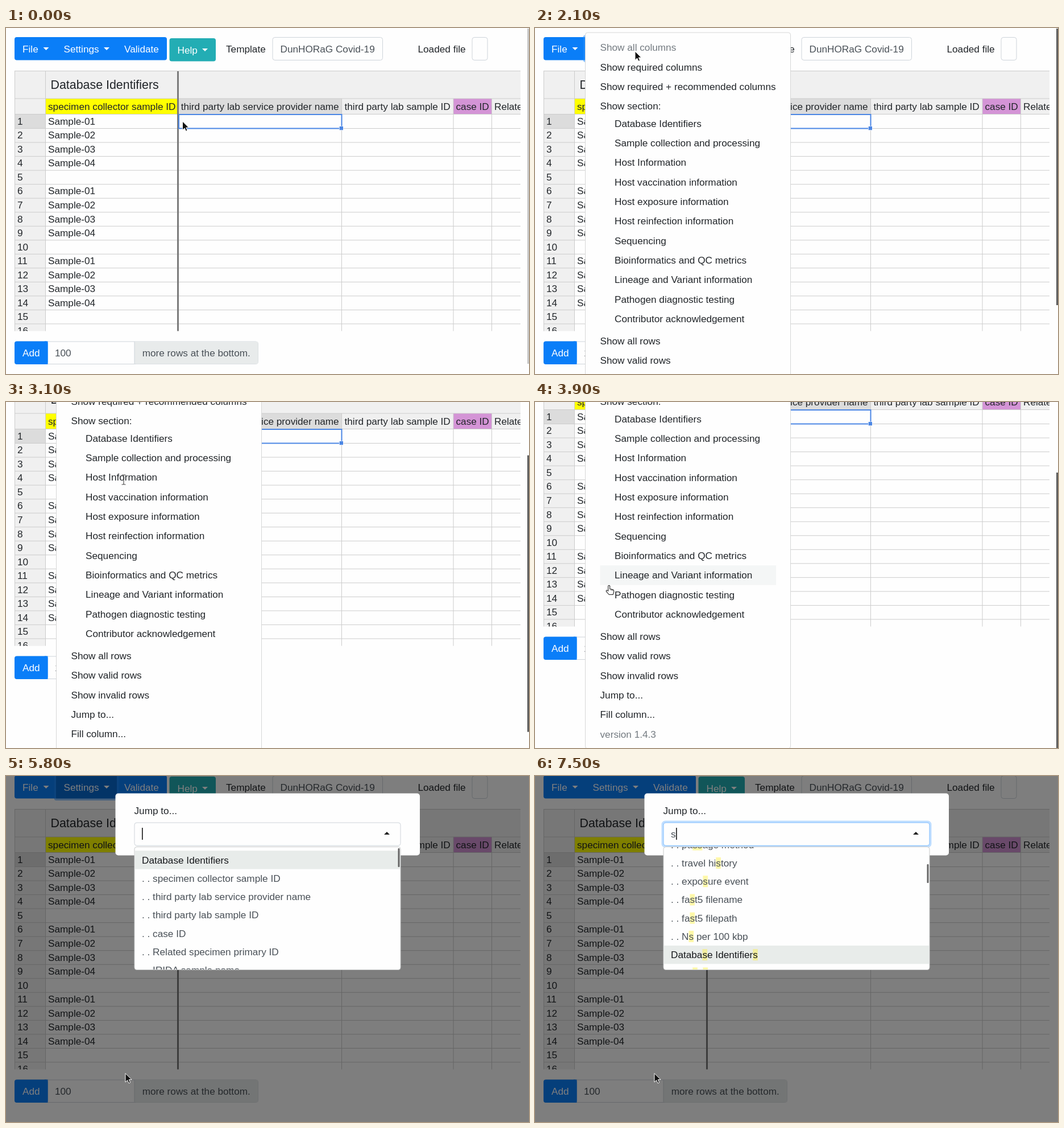
These frames come from a looping animation (920x608 px, 8000 ms). An HTML page:

```html
<!DOCTYPE html>
<html lang="en">
<head>
<meta charset="utf-8">
<title>Spreadsheet editor</title>
<style>
html, body { margin: 0; width: 100%; height: 100%; overflow: hidden; background: #fefefe; }
svg { display: block; width: 100%; height: 100%; }
text { font: 17.19px "Liberation Sans", Arial, sans-serif; fill: #212529; white-space: pre; }
</style>
</head>
<body>
<svg id="stage" viewBox="0 0 920 608"></svg>
<script>
const LOOP = 8000, BLUE = '#0a7ef8', PAPER = '#fefefe', LINE = '#cccccc', BORDER = '#ced4da', GREY = '#495057';
const stage = document.getElementById('stage');

// Markup helpers
const rect = (x, y, w, h, fill, more = '') =>
  `<rect x="${x}" y="${y}" width="${w}" height="${h}" fill="${fill}" ${more}/>`;
const box = (x, y, w, h, r = 4, stroke = BORDER) =>
  rect(x + .5, y + .5, w - 1, h - 1, PAPER, `rx="${r}" stroke="${stroke}"`);
const label = (x, mid, str, fill = '#212529', more = '') =>
  `<text x="${x}" y="${mid + 6}" style="fill:${fill}" ${more}>${str}</text>`;
const path = (d, fill, more = '') => `<path d="${d}" fill="${fill}" ${more}/>`;
const hline = (x1, x2, y, c = LINE) => path(`M${x1} ${y}H${x2}`, 'none', `stroke="${c}"`);
const vline = (x, y1, y2, c = LINE, w = 1) => path(`M${x} ${y1}V${y2}`, 'none', `stroke="${c}" stroke-width="${w}"`);
const caret = (x, y) => path(`M${x - 5} ${y}h10l-5 5z`, '#fff');
const group = (id, body, more = '') => `<g id="${id}" ${more}>${body}</g>`;
const clip = (id, x, y, w, h) => `<clipPath id="${id}">${rect(x, y, w, h, '#000')}</clipPath>`;

function toolbar() {
  return rect(15, 16, 268, 40.5, BLUE, 'rx="4"') +
    group('settings',
      rect(86.4, 14.3, 110.4, 43.9, 'none', 'id="ring" stroke="#268fff" stroke-opacity=".5" stroke-width="3.4" rx="2"') +
      rect(88, 16, 107, 40.5, '#0769d0')) +
    label(29, 36.5, 'File', '#fff') + caret(70.5, 34) +
    label(101.5, 36.5, 'Settings', '#fff') + caret(177, 34) +
    label(208, 36.5, 'Validate', '#fff') +
    rect(287.5, 18, 81.5, 40.5, '#23adb4', 'rx="4"') +
    label(301.5, 38.5, 'Help', '#fff') + caret(350, 36) +
    label(387, 36.5, 'Template') + box(468.5, 16, 194.5, 41) +
    label(482.5, 36.5, 'DunHORaG Covid-19', GREY) +
    label(724.5, 36.5, 'Loaded file') + box(819.5, 16, 28, 41);
}

function grid() {
  const top = 152, pitch = 24.53;
  let s = rect(15, 75, 890, 77, '#f0f0f0') + rect(15, 152, 55, 381, '#f0f0f0') +
    rect(15, top, 55, pitch, '#dcdcdc') + rect(70, 124, 232, 28, '#ffff00') +
    rect(304, 124, 287, 28, '#dcdcdc') + rect(787, 124, 67, 28, '#d494d6');
  s += hline(15, 905, 75.5) + hline(15, 905, 124) + hline(15, 905, 151.5);
  for (let i = 0; i < 16; i++) {
    const y = top + i * pitch;
    s += hline(15, 905, y + pitch) + label(20, y + 11.8, i + 1);
    if (i % 5 < 4 && i < 15) s += label(74, y + 11.8, 'Sample-0' + (i % 5 + 1));
  }
  s += vline(15.5, 75, 533) + vline(69.5, 75, 533);
  for (const x of [590.5, 787, 854.5]) s += vline(x, 124, 533);
  s += `<text x="78.5" y="107" style="font-size:21.4px">Database Identifiers</text>`;
  const heads = [[74, 'specimen collector sample ID'], [307.7, 'third party lab service provider name'],
    [595.5, 'third party lab sample ID'], [791.5, 'case ID'], [859, 'Related specimen primary ID']];
  for (const [x, name] of heads) s += label(x, 138, name);
  s += vline(302.5, 76, 533, '#7b7b7b', 3) +
    rect(304, 152, 286.5, 24.5, 'none', 'stroke="#4b86e4" stroke-width="2"') +
    rect(586, 172.5, 7.5, 7.5, PAPER) + rect(586.7, 173, 6.3, 6.3, '#4b86e4');
  return s;
}

function footer() {
  return box(15, 550.5, 429, 40.5) + rect(15, 550.5, 58.5, 40.5, BLUE, 'rx="4"') + rect(68, 550.5, 5.5, 40.5, BLUE) +
    rect(226, 551, 217.5, 39.5, '#e8ebeb', 'rx="3"') + vline(226, 551, 590.5, BORDER) +
    label(29, 571, 'Add', '#fff') + label(86, 571, '100', GREY) + label(239.7, 571, 'more rows at the bottom.', GREY);
}

// Settings menu
const topItems = ['Show all columns', 'Show required columns', 'Show required + recommended columns', 'Show section:'];
const sections = ['Database Identifiers', 'Sample collection and processing', 'Host Information',
  'Host vaccination information', 'Host exposure information', 'Host reinfection information', 'Sequencing',
  'Bioinformatics and QC metrics', 'Lineage and Variant information', 'Pathogen diagnostic testing',
  'Contributor acknowledgement'];
const lastItems = ['Show all rows', 'Show valid rows', 'Show invalid rows', 'Jump to...', 'Fill column...', 'version 1.4.3'];
const STEP = 34.37, JUMP = 18, FILL = 19;
const place = (list, x, y) => list.map((name, i) => ({ name, x, y: y + i * STEP }));
const items = [...place(topItems, 114.5, 34.3), ...place(sections, 140, 167.5), ...place(lastItems, 114.5, 549.8)];

function menu() {
  return box(88, 7.5, 362, 740, 4, '#d6d7d7') + rect(0, 0, 0, 0, 'none', 'id="hover"') +
    items.map((it, i) => label(it.x, it.y, it.name, i % 20 ? '#212529' : '#737a80', `id="item${i}"`)).join('');
}

// Jump dialog
const ROW = 32.25;
const fullList = ['Database Identifiers', '. . specimen collector sample ID', '. . third party lab service provider name',
  '. . third party lab sample ID', '. . case ID', '. . Related specimen primary ID', '. . IRIDA sample name'];
const foundList = ['. . passage method', '. . travel history', '. . exposure event', '. . fast5 filename',
  '. . fast5 filepath', '. . Ns per 100 kbp', 'Database Identifiers', '. . bases covered'];

function list(id, names, y, active) {
  const rows = names.map((name, i) =>
    label(239, y + i * ROW, name, i === active ? '#16181b' : GREY)).join('');
  return group(id, rect(227, y + active * ROW - 16.2, 466, ROW, '#e8ecea') + rows, 'clip-path="url(#listClip)"');
}

function dialog() {
  return rect(0, 0, 920, 608, '#000', 'opacity=".5"') +
    rect(192.5, 30.5, 535.5, 109, PAPER, 'rx="5"') + label(225.5, 61, 'Jump to...') +
    rect(224.2, 80.2, 471.6, 43.9, 'none', 'id="focus" rx="5" stroke="#bfdeff" stroke-width="3.4"') +
    rect(226, 82, 468, 40.3, PAPER, 'id="field" rx="4"') +
    path('M665 103h10l-5-5z', '#212121') +
    label(239, 101.5, 's', GREY, 'id="typed"') + rect(239, 91, 1.7, 21, '#222', 'id="bar"') +
    box(225.5, 124, 469, 217, 4, '#c9cbcb') +
    list('full', fullList, 147.5, 0) + list('found', foundList, 120.7, 6) +
    rect(689.5, 127, 3, 33, '#666', 'id="thumb" rx="1"');
}

const cursors = group('arrow', path('M0 0V15.5L3.6 12 6 17.3 8.6 16.2 6.3 11H11z', '#111', 'stroke="#fff" stroke-width="1" stroke-linejoin="round"')) +
  group('hand', path('M4.2 10V2.3a1.5 1.5 0 0 1 3 0V7l5 1q1.9.5 1.9 2.3v2.6L12.6 17H5.8L1 11.6Q.2 9.7 1.7 9.2q1-.1 2.5 1.5z',
    '#fff', 'stroke="#222" stroke-width="1.1" stroke-linejoin="round"') +
    path('M9.5 7.5v2.3M11.8 8v2', 'none', 'stroke="#222"')) +
  group('beam', path('M0 0h2.6l.9.8.9-.8H7M3.5.8v15.4M0 17h2.6l.9-.8.9.8H7', 'none', 'stroke="#444" stroke-width="1.1"'));

stage.innerHTML = `<defs>${clip('gridClip', 15, 75, 890, 457.5)}${clip('listClip', 226, 125, 468, 215)}</defs>` +
  rect(0, 0, 920, 608, PAPER) +
  group('page', toolbar() + group('grid', grid(), 'clip-path="url(#gridClip)"') + footer() + group('menu', menu())) +
  rect(917, 1, 3, 589, '#c8c8c8', 'id="scroll"') + group('dialog', dialog()) + cursors;

const el = id => document.getElementById(id);
const set = (id, attrs) => { for (const k in attrs) el(id).setAttribute(k, attrs[k]); };
const show = (id, on) => { el(id).style.display = on ? '' : 'none'; };

// Mark every "s" in the search results
for (const t of [...el('found').querySelectorAll('text')]) {
  [...t.textContent].forEach((c, i) => {
    if (c !== 's') return;
    const b = t.getExtentOfChar(i);
    t.insertAdjacentHTML('beforebegin', rect(b.x, b.y, b.width, b.height, '#ffed28', 'fill-opacity=".4"'));
  });
}

// time, cursor, x, y, hovered menu item
const moves = [
  [0, 'arrow', 310.5, 164], [100, 'arrow', 308.5, 165.5], [500, 'arrow', 289, 151],
  [700, 'arrow', 280, 134], [800, 'arrow', 252, 98], [900, 'arrow', 214, 66],
  [1000, 'hand', 177, 44], [1200, 'hand', 177, 42], [1300, 'hand', 174, 41], [1500, 'hand', 170.5, 40],
  [2000, 'arrow', 176, 41], [2600, 'arrow', 181, 48], [2700, 'hand', 188, 72, 1], [2800, 'hand', 198, 104, 2],
  [2900, 'beam', 203.5, 128], [3200, 'hand', 202, 135, 7], [3400, 'hand', 181, 165, 8], [3500, 'hand', 146, 201, 9],
  [3900, 'hand', 124.5, 321.5, 12], [4000, 'arrow', 80, 470], [4100, 'arrow', 55, 569], [4300, 'none', 0, 0],
  [4500, 'arrow', 183, 573], [4600, 'hand', 130, 557, FILL], [4800, 'hand', 156, 532, FILL],
  [4900, 'hand', 181, 512, JUMP], [5400, 'hand', 207, 520, JUMP], [5800, 'arrow', 210, 522.5]
];

function scrollAt(t) {
  if (t >= 5800) return 17;
  return t < 3000 ? 0 : t < 3100 ? 46 : t < 3200 ? 104 : 138;
}

function draw(t) {
  const [, kind, x, y, hover] = moves.filter(m => m[0] <= t).pop();
  for (const c of ['arrow', 'hand', 'beam']) show(c, c === kind);
  if (kind !== 'none') set(kind, { transform: `translate(${x} ${y})` });

  const open = t >= 2000 && t < 5800, modal = t >= 5800, found = t >= 7500, focused = t >= 5900;
  const scroll = scrollAt(t);
  set('page', { transform: `translate(0 ${-scroll})` });
  show('settings', t >= 1000 && !focused);
  show('ring', t >= 1900);
  show('menu', open);
  show('scroll', !modal);
  set('scroll', open
    ? { y: 1 + scroll * 123 / 138, height: 486, fill: '#606060' }
    : { y: 1, height: 589, fill: '#c8c8c8' });

  const pressed = t >= 5500;
  show('hover', hover !== undefined);
  if (hover !== undefined) {
    const it = items[hover], sub = it.x > 120;
    set('hover', { x: sub ? 114.5 : 88.5, y: it.y - 17.2, width: sub ? 309.5 : 361, height: STEP,
      fill: pressed ? BLUE : '#f4f6f6' });
  }
  el('item' + JUMP).style.fill = pressed ? '#fff' : '#212529';

  show('dialog', modal);
  show('focus', focused);
  set('field', { stroke: focused ? '#80bdff' : BORDER });
  show('typed', found);
  show('bar', t < 6800 || t >= 7100);
  set('bar', { x: found ? 248 : 239 });
  show('full', !found);
  show('found', found);
  const fade = found ? 0 : Math.min(4, Math.max(0, Math.floor((t - 6700) / 100)));
  set('thumb', { y: found ? 155 : 127, opacity: 1 - fade * .17 });
}

const start = performance.now();
function tick() {
  draw((performance.now() - start) % LOOP);
  requestAnimationFrame(tick);
}
tick();
</script>
</body>
</html>
```
